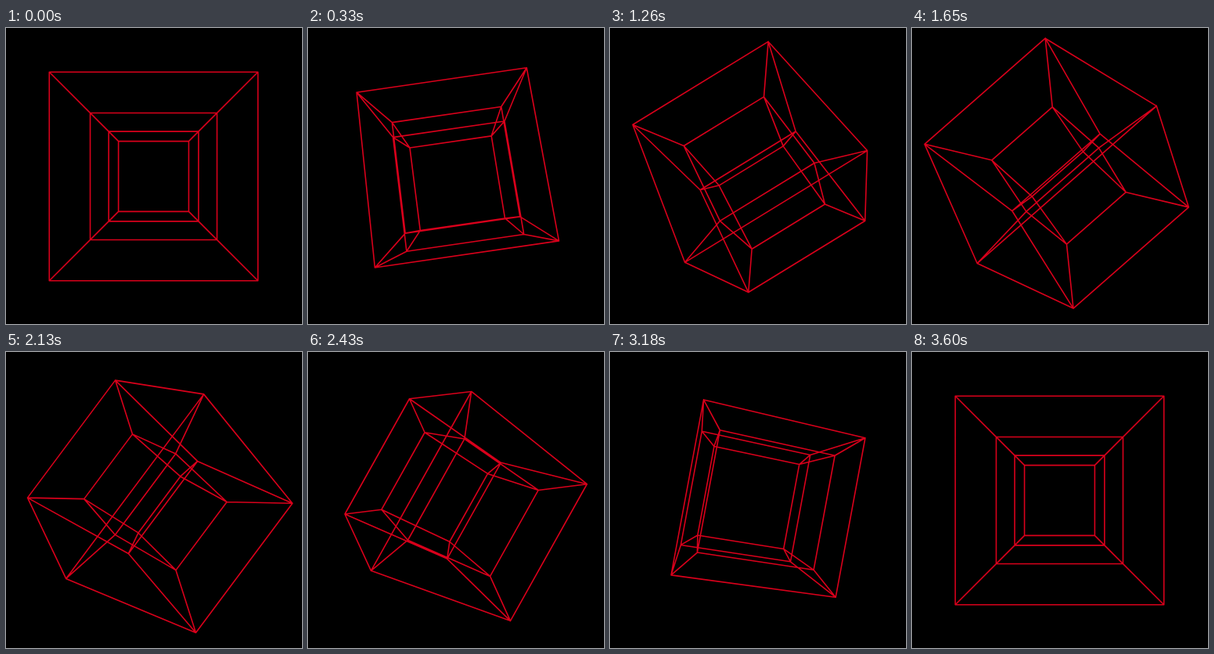
An HTML page with a canvas for the animation above (3.63 s loop, 378x378 px).

```html
<!DOCTYPE html>
<html lang="en">
<head>
<meta charset="utf-8">
<title>Tesseract</title>
<style>
  html, body { margin: 0; width: 100%; height: 100%; overflow: hidden; background: #000; }
  canvas { display: block; }
</style>
</head>
<body>
<canvas id="stage" width="378" height="378"></canvas>
<script>
const ctx = document.getElementById('stage').getContext('2d');
const CENTER = { x: 188.5, y: 189.5 };
const FRAME_MS = 30;
const TURN_FRAMES = 120;
const FOCAL = 413;
const DISTANCE = 4.1;
const EASE_ARC = 2.27;

// Bits 0-2 pick a cube corner, bit 3 picks one of the two cubes.
const sign = (index, bit) => (index >> bit & 1 ? 1 : -1);

const edges = [];
for (let i = 0; i < 16; i++) {
  for (let bit = 0; bit < 4; bit++) {
    if (!(i >> bit & 1)) edges.push([i, i | 1 << bit]);
  }
}

// Runs 1 -> 0 -> 1 over a turn, smooth only at the middle.
function spread(progress) {
  const q = Math.abs(1 - 2 * progress);
  return (1 - Math.cos(EASE_ARC * q)) / (1 - Math.cos(EASE_ARC));
}

function project(index, angle, mix) {
  const c = Math.cos(angle), s = Math.sin(angle);
  const x = sign(index, 0), y = sign(index, 1), z = sign(index, 2);
  const size = 0.75 + sign(index, 3) * (mix - 0.5) * 0.5;
  const tiltedY = c * y - s * z;
  const depth = c * z + s * y;
  const scale = FOCAL * size / (DISTANCE - depth * size);
  return {
    x: CENTER.x + scale * (c * x + s * tiltedY),
    y: CENTER.y + scale * (c * tiltedY - s * x)
  };
}

function draw(time) {
  const frame = Math.floor(time / FRAME_MS) % (TURN_FRAMES + 1);
  const progress = frame / TURN_FRAMES;
  const angle = progress * Math.PI / 2;
  const mix = spread(progress);
  const points = Array.from({ length: 16 }, (_, i) => project(i, angle, mix));

  ctx.fillStyle = '#000';
  ctx.fillRect(0, 0, 378, 378);
  ctx.strokeStyle = '#d9001b';
  ctx.lineWidth = 1.6;
  ctx.lineCap = 'round';
  ctx.beginPath();
  for (const [a, b] of edges) {
    ctx.moveTo(points[a].x, points[a].y);
    ctx.lineTo(points[b].x, points[b].y);
  }
  ctx.stroke();
}

let start;
function tick(now) {
  start ??= now;
  draw(Math.max(0, now - start));
  requestAnimationFrame(tick);
}
draw(0);
requestAnimationFrame(tick);
</script>
</body>
</html>
```
